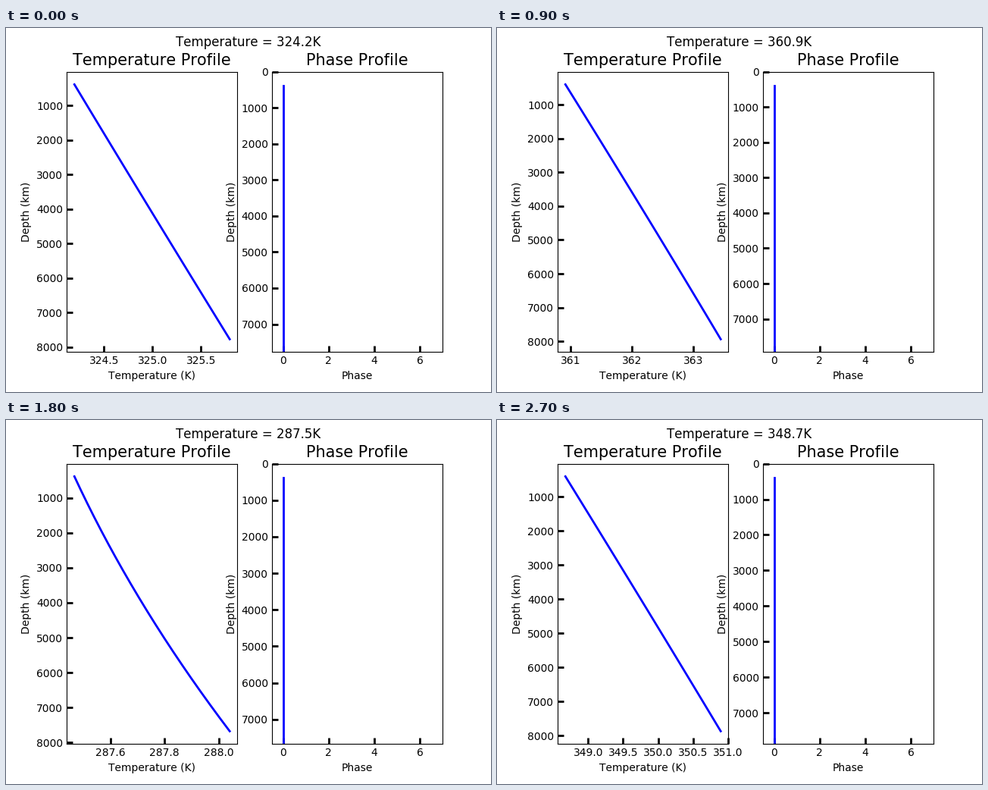
Animation, 640 px wide and 480 px high, one loop 3 s. Source, as a matplotlib script:

```python
import numpy as np
import matplotlib.pyplot as plt
from matplotlib.animation import FuncAnimation

plt.rcParams.update({
    "font.family": "DejaVu Sans",
    "text.kerning_factor": 6,
    "axes.formatter.useoffset": False,
    "xtick.direction": "in", "ytick.direction": "in",
    "xtick.major.size": 6, "ytick.major.size": 6,
    "xtick.major.width": 2, "ytick.major.width": 2,
})

SURFACE = np.linspace(263, 373, 10)
ORDER = [5, 0, 6, 8, 4, 1, 2, 3, 9, 7]
FREEZING = 273.15
STEPS = 20
PRESSURE_STEP = 46.26e6 / STEPS
GRAVITY = 5.975
STIFFENING = 0.95  # how far the compressibility trend persists under load


class Water:
    phase = 0
    heat_capacity = 4.15e6  # per volume

    @staticmethod
    def density(t):
        top = np.polyval([-280.54253e-12, 105.56302e-9, -46.170461e-6,
                          -7.9870401e-3, 16.945176, 999.83952], t)
        return top / (1 + 16.87985e-3 * t)

    @staticmethod
    def compressibility(t):
        top = np.polyval([4.10411e-10, -5.847727e-8, 2.008438e-5,
                          1.459187e-3, 0.6163813, 50.88496], t)
        return 1e-11 * top / (1 + 1.967348e-2 * t)


class Ice:
    phase = 1
    heat_capacity = 1.856e6

    @staticmethod
    def density(t):
        return 919.1 * np.exp(-1.535e-4 * (t + 10))

    @staticmethod
    def compressibility(t):
        return 1.1e-10 + 2.5e-13 * (t + 10)


def slope(func, t, h=0.01):
    return (func(t + h) - func(t - h)) / (2 * h)


def profile(temp):
    """Follow an adiabat downwards in equal pressure steps."""
    depth, rows = 0, []
    for step in range(STEPS):
        t, pressure = temp - FREEZING, step * PRESSURE_STEP
        matter = Water if t > 0 else Ice
        squeeze = STIFFENING * pressure
        density = matter.density(t) * np.exp(matter.compressibility(t) * squeeze)
        expansion = (-slope(matter.density, t) / matter.density(t)
                     - slope(matter.compressibility, t) * squeeze)
        temp += expansion * temp * PRESSURE_STEP / matter.heat_capacity
        depth += PRESSURE_STEP / (density * GRAVITY)
        rows.append((depth, temp, matter.phase))
    return np.array(rows).T


def padded(values, margin=0.05):
    low, high = values.min(), values.max()
    pad = margin * (high - low)
    return low - pad, high + pad


fig, (ax_temp, ax_phase) = plt.subplots(1, 2, figsize=(6.4, 4.8), dpi=100)
heading = fig.suptitle("", fontsize=12)
temp_line, = ax_temp.plot([], [], color="blue", lw=2)
phase_line, = ax_phase.plot([], [], color="blue", lw=2)

for ax, title, xlabel in ((ax_temp, "Temperature Profile", "Temperature (K)"),
                          (ax_phase, "Phase Profile", "Phase")):
    ax.set_title(title, fontsize=15)
    ax.set_xlabel(xlabel)
    ax.set_ylabel("Depth (km)")
ax_phase.set_xlim(-0.5, 7)


def update(frame):
    depth, temp, phase = profile(SURFACE[ORDER[frame]])
    temp_line.set_data(temp, depth)
    phase_line.set_data(phase, depth)
    ax_temp.set_xlim(*padded(temp))
    ax_temp.set_ylim(*padded(depth)[::-1])
    ax_phase.set_ylim(depth[-1], 0)
    heading.set_text(f"Temperature = {temp[0]:.1f}K")
    return temp_line, phase_line, heading


anim = FuncAnimation(fig, update, frames=len(ORDER), interval=300,
                     repeat=True, repeat_delay=0, blit=False)
plt.show()
```
